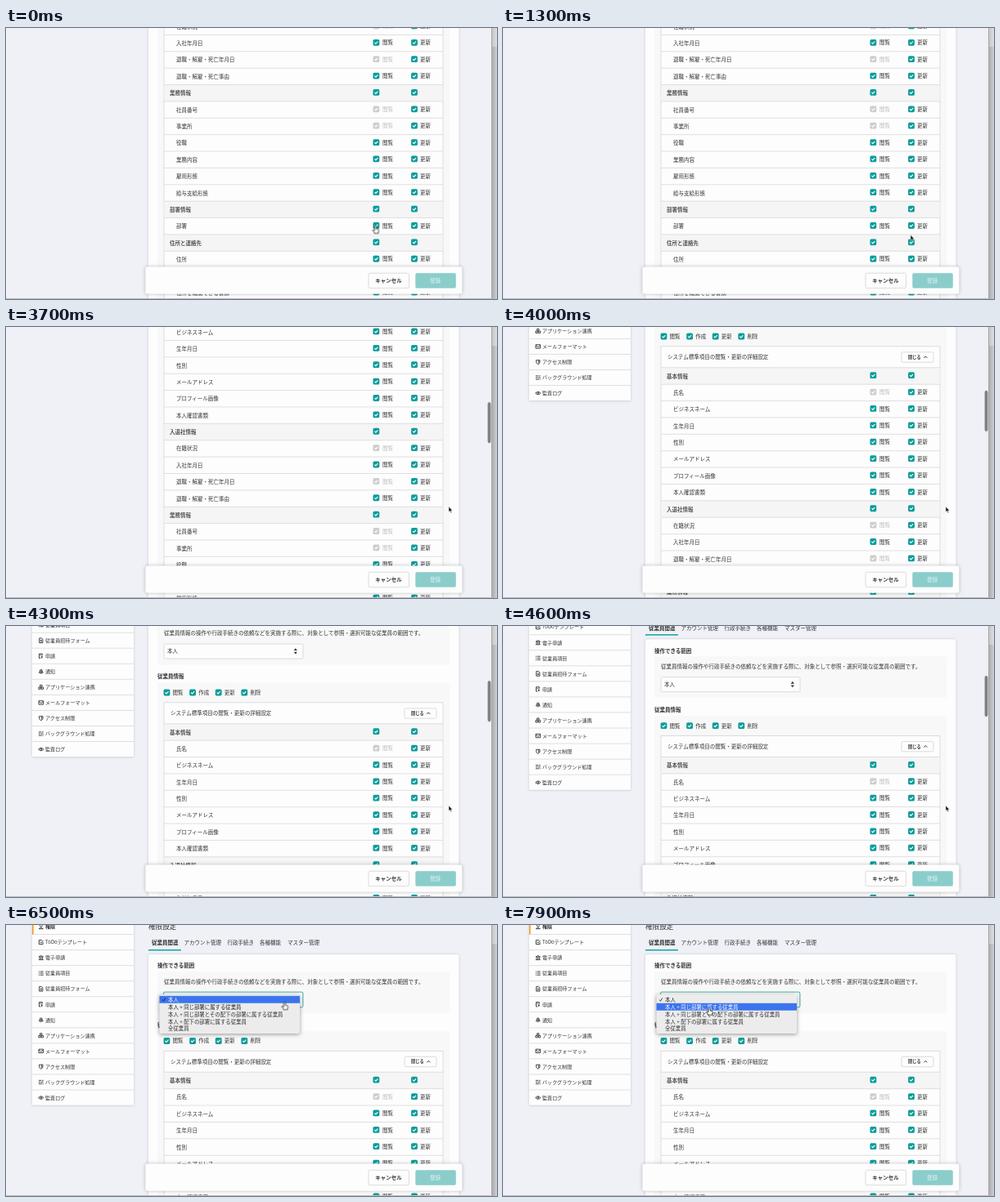
An HTML page that plays this animation: 600x332 px, repeating every 8000 ms.

```html
<!DOCTYPE html>
<html lang="ja">
<head>
<meta charset="utf-8">
<title>権限設定</title>
<style>
@property --s { syntax: '<number>'; inherits: true; initial-value: 0; }
html, body { margin: 0; width: 100%; height: 100%; overflow: hidden; background: #eff1f6; }
svg { display: block; width: 600px; height: 332px; animation: scroll 8s infinite; }
text { font: 500 6.5px "Noto Sans CJK JP", "Noto Sans CJK", sans-serif; fill: #333; white-space: pre; }
.bold { font-weight: 700; }
.head { font-weight: 700; fill: #555; }
.side { font-size: 6.1px; }
.menu { font-size: 6.4px; }
.title { font-size: 8.6px; }
.small { font-size: 5.2px; font-weight: 700; }
.off { fill: #bfbfbf; }
.faint { fill: #c9e9e8; font-weight: 700; }
.line { stroke: #d9d9d9; stroke-width: .8; }
.edge { fill: #fdfdfd; stroke: #d4d4d4; stroke-width: .8; }
.icon { fill: none; stroke: #333; stroke-width: .9; }
.soft { filter: drop-shadow(0 0 1.5px rgba(40, 45, 60, .2)); }

#page { transform: translateY(calc(var(--s) * -1px)); }
#thumb { transform: translateY(calc(var(--s) * .152px)); animation: thumb 8s step-end infinite; }
#cursor { animation: move 8s infinite; }
#hand { animation: hand 8s step-end infinite; }
#arrow { animation: arrow 8s step-end infinite; }
#select { animation: hover 8s step-end infinite; }
#popup, #ring { animation: open 8s step-end infinite; }
#mark { animation: mark 8s step-end infinite; }
#item0 { animation: item0 8s step-end infinite; }
#item1 { animation: item1 8s step-end infinite; }

/* 1.25% is one 100 ms tick */
@keyframes scroll {
  0%, 40% { --s: 375.7; animation-timing-function: step-end; }
  41.25% { --s: 375; animation-timing-function: steps(2); }
  43.75% { --s: 308; animation-timing-function: steps(2); }
  46.25% { --s: 225; animation-timing-function: steps(2); }
  48.75% { --s: 158; animation-timing-function: steps(2); }
  51.25% { --s: 103; animation-timing-function: steps(2); }
  53.75% { --s: 60.5; animation-timing-function: steps(2); }
  56.25% { --s: 29.7; animation-timing-function: steps(2); }
  58.75% { --s: 10; animation-timing-function: steps(2); }
  61.25% { --s: 1; animation-timing-function: step-end; }
  62.5%, 100% { --s: 0; animation-timing-function: step-end; }
}
@keyframes thumb {
  0% { opacity: 0; }
  42.5% { opacity: 1; }
  65% { opacity: .6; }
  66.25% { opacity: .3; }
  67.5%, 100% { opacity: 0; }
}
@keyframes move {
  0% { transform: translate(451.5px, 242.3px); animation-timing-function: steps(7); }
  8.75% { transform: translate(499px, 243px); }
  10% { transform: translate(499px, 243px); animation-timing-function: steps(5); }
  16.25% { transform: translate(498px, 253.5px); }
  30% { transform: translate(498px, 253.5px); animation-timing-function: steps(7); }
  38.75% { transform: translate(541px, 220px); }
  62.5% { transform: translate(541px, 220px); animation-timing-function: steps(5); }
  68.75% { transform: translate(340.5px, 94.5px); }
  81.25% { transform: translate(340.5px, 94.5px); animation-timing-function: steps(12); }
  96.25% { transform: translate(254px, 101px); animation-timing-function: steps(2); }
  98.75%, 100% { transform: translate(252px, 101px); }
}
@keyframes hand {
  0%, 7.5%, 67.5%, 100% { opacity: 1; }
  5%, 13.75% { opacity: 0; }
}
@keyframes arrow {
  0%, 7.5%, 67.5%, 100% { opacity: 0; }
  5%, 13.75% { opacity: 1; }
}
@keyframes hover {
  0%, 75%, 100% { fill: #fdfdfd; }
  67.5% { fill: #eee; }
}
@keyframes open {
  0% { opacity: 0; }
  75%, 100% { opacity: 1; }
}
@keyframes mark {
  0% { transform: translateY(-8.95px); }
  82.5%, 100% { transform: none; }
}
@keyframes item0 {
  0% { fill: #fff; }
  82.5%, 100% { fill: #222; }
}
@keyframes item1 {
  0% { fill: #222; }
  82.5%, 100% { fill: #fff; }
}
</style>
</head>
<body>
<svg viewBox="0 0 600 332">
  <linearGradient id="shade">
    <stop stop-color="#a6a6a8"/>
    <stop offset="1" stop-color="#d0d0d2"/>
  </linearGradient>
  <rect width="600" height="332" fill="#eff1f6"/>
  <g id="page">
    <g id="sidebar">
      <rect class="soft" x="32" y="-80" width="124" height="301" rx="1.5" fill="#fdfdfd"/>
    </g>
    <g id="main">
      <rect class="soft" x="174" y="36" width="379.5" height="760" rx="2.5" fill="#fdfdfd"/>
      <rect x="185" y="57" width="357" height="51" fill="#f8f8f8"/>
      <rect x="185" y="130" width="357" height="640" fill="#f8f8f8"/>
      <rect x="174" y="30" width="40" height="1.4" fill="#00a09b"/>
      <rect id="select" class="edge" x="193" y="82.5" width="170" height="18" rx="1.5"/>
      <path d="M351.7 90.5l2.1-2.8 2.1 2.8zM351.7 92.3l2.1 2.8 2.1-2.8z" fill="#333"/>
      <rect class="edge" x="193" y="154.3" width="341" height="600"/>
      <rect class="edge" x="487" y="161.3" width="39" height="12.4" rx="1.5"/>
      <path d="M514.3 168.4l2-2 2 2" fill="none" stroke="#333"/>
    </g>
    <g id="table"></g>
  </g>

  <rect id="thumb" x="588.6" y="58" width="3.8" height="50" rx="1.9" fill="#7f8084"/>

  <rect x="170.4" y="292.6" width="387" height="33.2" rx="2.5" fill="#fdfdfd" style="filter:drop-shadow(0 .5px 2px rgba(30,35,50,.3))"/>
  <g id="footer">
    <rect class="edge" x="443" y="300.3" width="49.5" height="18.4" rx="1.8"/>
    <rect x="500.3" y="300.2" width="49.5" height="18.5" rx="1.8" fill="#8bcdcb"/>
  </g>

  <rect x="593" width="7" height="332" fill="url(#shade)"/>
  <rect x="594" width="6" height="23" fill="#fff" opacity=".3"/>
  <rect y="331" width="594" height="1" fill="#bdbdc1"/>

  <rect id="ring" x="192.6" y="82.2" width="170.2" height="18.6" rx="1.8" fill="#fdfdfd" stroke="#69c0bc" stroke-width="1.3"/>
  <g id="popup">
    <rect x="187.5" y="85" width="171.5" height="48" rx="2" fill="#ececec" style="filter:drop-shadow(0 1px 2.5px rgba(0,0,0,.4))"/>
    <rect id="mark" x="187.5" y="95.8" width="171.5" height="8.9" fill="#3b74ee"/>
    <path d="M191.2 91.6l1.3 1.7 2.2-4" fill="none" stroke="#222" stroke-width=".8"/>
  </g>

  <g id="cursor">
    <path id="arrow" d="M0 0V6.6L1.5 5.3 2.6 7.8 3.7 7.3 2.6 4.9H4.6Z" fill="#111" stroke="#fff" stroke-width=".5"/>
    <path id="hand" d="M-1 .8Q-1 0 0 0Q1 0 1 .8V3.8L3.4 4.4Q4.2 4.7 4.1 5.6L3.6 7.8V9.2H-1.5V8.2L-3.3 5.8Q-3.6 5 -2.7 4.9L-1 6Z" fill="#fff" stroke="#222" stroke-width=".8"/>
  </g>
</svg>

<script>
const put = (id, markup) => document.getElementById(id).insertAdjacentHTML('beforeend', markup);

// y is the optical middle of the line
const text = (x, y, str, cls = '', size = 6.5, id = '') =>
  `<text x="${x}" y="${(y + size * .37).toFixed(2)}" class="${cls}" ${id && `id="${id}"`}>${str}</text>`;

const check = (x, y, off) =>
  `<rect x="${x}" y="${y - 3.9}" width="7.8" height="7.8" rx="1.6" fill="${off ? '#cdcdcd' : '#0a9c9a'}"/>
   <path d="M${x + 2} ${y}l1.4 1.5 2.5-2.8" fill="none" stroke="#fff" stroke-width="1.1"/>`;

// Sidebar: label and icon path in a 7 by 7 box
const links = [
  ['権限', 'M3.5 .8a1.4 1.4 0 1 0 .1 0M1 6.2q2.5-3.4 5 0z'],
  ['ToDoテンプレート', 'M5.8 3.5V6H1V1H4.6M2.2 3.2l1.2 1.3L6.3 1.2'],
  ['電子申請', 'M.8 2.4L3.5 .9 6.2 2.4ZM1.7 3V5.5M3.5 3V5.5M5.3 3V5.5M.6 6H6.4'],
  ['従業員項目', 'M.6 1.4H1.6M2.4 1.4H6.4M.6 3.5H1.6M2.4 3.5H6.4M.6 5.6H1.6M2.4 5.6H6.4'],
  ['従業員招待フォーム', 'M1.4 .7H4.2L5.6 2V6.4H1.4ZM2.4 3.2H4.6M2.4 4.7H4.6'],
  ['申請', 'M5 3V.8H1.2V6.2H3M2.2 2.4H4M3.4 4.6H5.6M4.5 3.6V6.3'],
  ['通知', 'M1 5Q2 4 2 2.6Q2.3 1 3.5 1Q4.7 1 5 2.6Q5 4 6 5ZM3 6H4M2.8 2V4.6M4.1 2V4.6'],
  ['アプリケーション連携', 'M2.3 .9H4.7V3H2.3ZM.6 3.7H3V6H.6ZM4 3.7H6.4V6H4Z'],
  ['メールフォーマット', 'M.7 1.3H6.3V5.7H.7ZM.7 2L3.5 4.2 6.3 2'],
  ['アクセス制限', 'M1.3 1.2H5.7V3.6Q5.5 5.4 3.5 6.3Q1.5 5.4 1.3 3.6ZM4.4 1.5V5'],
  ['バックグラウンド処理', 'M.6 1.4H4M4.6 1.4H6.4M.6 3.5H2.6M3.2 3.5H6.4M.6 5.6H4.6M5.2 5.6H6.4'],
  ['監査ログ', 'M.4 3.5Q3.5 0 6.6 3.5Q3.5 7 .4 3.5ZM3.5 2.6a.9 .9 0 1 0 .1 0']
];
links.forEach(([label, icon], i) => {
  const y = 2 + 19.05 * i;
  put('sidebar', `<path class="line" d="M32 ${y + 9.5}H156"/>
    <path class="icon" transform="translate(39.3 ${y - 3.5})" d="${icon}"/>` +
    text(48, y, label, i ? 'side' : 'side bold', 6.1));
});
put('sidebar', '<rect x="32" y="-7.5" width="1.6" height="19" fill="#f39a1f"/>');

// Headings and controls
put('main', text(174, 1.8, '権限設定', 'title', 8.6));
[[178, '従業員関連'], [217.5, 'アカウント管理'], [270.5, '行政手続き'], [310, '各種機能'], [344, 'マスター管理']]
  .forEach(([x, label], i) => put('main', text(x, 22, label, i ? '' : 'bold')));
put('main',
  text(185, 50, '操作できる範囲', 'bold') +
  text(193, 69.3, '従業員情報の操作や行政手続きの依頼などを実施する際に、対象として参照・選択可能な従業員の範囲です。') +
  text(197, 91.5, '本人') +
  text(185, 122.5, '従業員情報', 'bold') +
  text(201, 167.3, 'システム標準項目の閲覧・更新の詳細設定') +
  text(495, 167.5, '閉じる', 'small', 5.2));
['閲覧', '作成', '更新', '削除'].forEach((label, i) => {
  const x = 192.6 + 31.6 * i;
  put('main', check(x, 142) + text(x + 11, 142, label));
});

// Table: # starts a section, - means viewing is locked
const rows = `#基本情報 -氏名 ビジネスネーム 生年月日 性別 メールアドレス プロフィール画像 本人確認書類
  #入退社情報 -在籍状況 入社年月日 -退職・解雇・死亡年月日 退職・解雇・死亡事由
  #業務情報 -社員番号 -事業所 役職 業務内容 雇用形態 給与支給形態
  #部署情報 部署 #住所と連絡先 住所 電話番号 住所を確認できる書類`.split(/\s+/);
rows.forEach((row, i) => {
  const y = 190.3 + 20.38 * i, head = row[0] === '#', off = row[0] === '-';
  const label = row.replace(/^[#-]/, '');
  put('table',
    (head ? `<rect x="193.4" y="${y - 10}" width="340.2" height="20.4" fill="#f5f5f5"/>` : '') +
    `<path class="line" d="M193 ${y - 10}H534"/>` +
    text(head ? 200 : 208, y + .3, label, head ? 'head' : '') +
    check(448.5, y - .6, off) + check(495.1, y - .6) +
    (head ? '' : text(460, y - .3, '閲覧', off ? 'off' : '') + text(506, y - .3, '更新')));
});

put('footer', text(451.3, 309.4, 'キャンセル', 'bold') + text(518, 309.4, '登録', 'faint'));

['本人', '本人 + 同じ部署に属する従業員', '本人 + 同じ部署とその配下の部署に属する従業員', '本人 + 配下の部署に属する従業員', '全従業員']
  .forEach((label, i) => put('popup', text(198, 91.3 + 8.95 * i, label, 'menu', 6.4, 'item' + i)));
</script>
</body>
</html>
```
